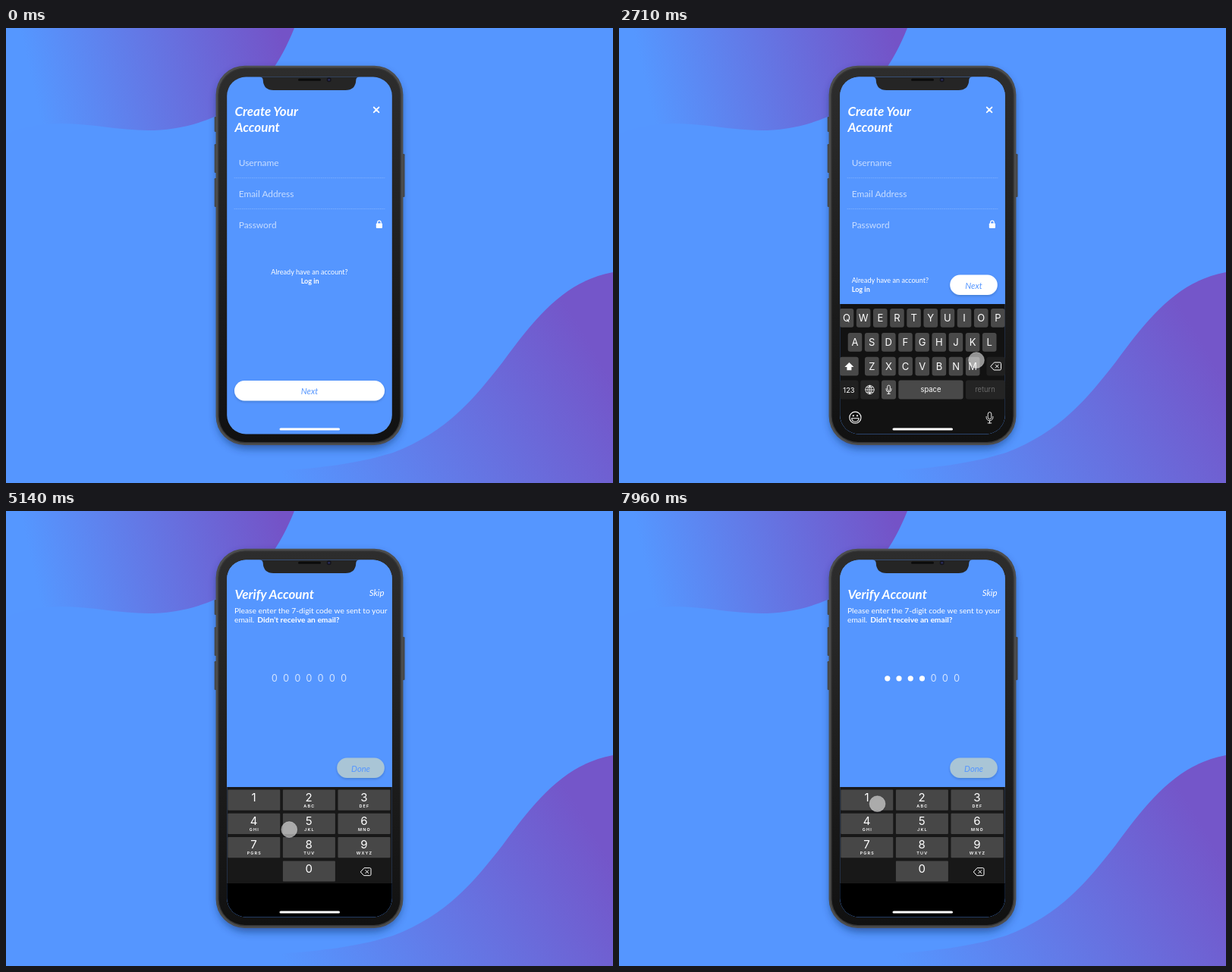
An HTML page that plays this animation: 800 px wide and 600 px high, repeating every 7990 ms.

```html
<!DOCTYPE html>
<html lang="en">
<head>
<meta charset="utf-8">
<title>Sign-up flow</title>
<style>
html, body { margin: 0; width: 100%; height: 100%; overflow: hidden; background: #5596ff; }
svg { display: block; width: 800px; height: 600px; }
text { font-family: Lato, sans-serif; fill: #fff; white-space: pre; }
.title { font-weight: 700; font-style: italic; font-size: 17px; }
.field { font-size: 11.9px; }
.hint { opacity: .68; }
.small { font-size: 9.1px; }
.body { font-size: 10.25px; }
.bold { font-weight: 700; }
.btn { font-size: 11.2px; font-style: italic; fill: #5596ff; text-anchor: middle; }
.key, .num, .sub, .fn { font-family: Inter, Roboto, sans-serif; text-anchor: middle; }
.key { font-size: 13px; }
.num { font-size: 15px; }
.sub { font-size: 5.4px; font-weight: 600; letter-spacing: 1.2px; }
.fn { font-size: 9.4px; }
.line { fill: none; stroke: #fff; stroke-linecap: round; stroke-linejoin: round; }
</style>
</head>
<body>
<svg id="stage" viewBox="0 0 800 600"></svg>
<script>
const LOOP = 7990, SLIDE = 222, BLUE = '#5596ff', KEY = '#494949';

const rect = (x, y, w, h, r, fill, more = '') =>
  `<rect x="${x}" y="${y}" width="${w}" height="${h}" rx="${r}" fill="${fill}" ${more}/>`;
const text = (x, y, cls, s, more = '') => `<text x="${x}" y="${y}" class="${cls}" ${more}>${s}</text>`;
const line = (d, w = 1, more = '') => `<path class="line" d="${d}" stroke-width="${w}" ${more}/>`;

const homeBar = rect(360.5, 527.5, 79.5, 3, 1.5, '#fff');
const button = (x, y, w, label, fill = '#fff') =>
  rect(x, y, w, 26.5, 13.25, fill, 'filter="url(#soft)"') + text(x + w / 2, y + 18.3, 'btn', label);
const backspace = (x, y) =>
  line(`M${x - 7} ${y}l4.5 -5h7.5q1.5 0 1.5 1.5v7q0 1.5 -1.5 1.5h-7.5z` +
       `M${x - .7} ${y - 2}l4 4m0 -4l-4 4`, 1);
const mic = (x, y, k) =>
  line(`M${x - 2 * k} ${y - 4 * k}a${2 * k} ${2 * k} 0 0 1 ${4 * k} 0v${4 * k}a${2 * k} ${2 * k} 0 0 1 ${-4 * k} 0z` +
       `M${x - 3.8 * k} ${y - k}v${k}a${3.8 * k} ${3.8 * k} 0 0 0 ${7.6 * k} 0v${-k}` +
       `M${x} ${y + 4 * k}v${2.5 * k}m${-2 * k} 0h${4 * k}`, .9);

function keyboard() {
  let s = rect(289, 364, 222, 174, 0, '#121212');
  const row = (letters, cx, y) => [...letters].forEach((c, i) => {
    const x = cx + i * 22.15;
    s += rect(x - 9.3, y, 18.6, 24.7, 3, KEY) + text(x, y + 17.1, 'key', c);
  });
  row('QWERTYUIOP', 300, 370);
  row('ASDFGHJKL', 311, 402);
  row('ZXCVBNM', 333.3, 433.8);
  s += rect(291, 433.8, 24.7, 24.7, 3, KEY) +
    '<path d="M303.4 441l6 6h-3v4.2h-6v-4.2h-3z" fill="#fff"/>';
  s += rect(484.5, 433.8, 24.5, 24.7, 3, '#202020') + backspace(497, 446);
  s += rect(291, 464.5, 24.5, 25, 3, '#202020') + text(303, 480.5, 'fn', '123');
  s += rect(318.3, 464.5, 24.5, 25, 3, '#262626') +
    line('M324.8 477a5.7 5.7 0 1 0 11.4 0a5.7 5.7 0 1 0 -11.4 0h11.4M330.5 471.3v11.4' +
         'M330.5 471.3q-5.4 5.7 0 11.4q5.4 -5.7 0 -11.4M326.2 473.7h8.6M326.2 480.3h8.6', .8);
  s += rect(346, 464.5, 19, 25, 3, KEY) + mic(355.5, 476.5, .9);
  s += rect(368.3, 464.5, 85.3, 25, 3, KEY) + text(411, 480, 'fn', 'space');
  s += rect(457, 464.5, 52, 25, 3, '#242424') + text(482.5, 480, 'fn', 'return', 'style="fill:#696969"');
  s += line('M303.8 513.7a7.6 7.6 0 1 0 15.2 0a7.6 7.6 0 1 0 -15.2 0M306.6 514.8h9.6q-.6 4.4 -4.8 4.4t-4.8 -4.4z', 1.1) +
    '<circle cx="308.8" cy="511.3" r="1.1" fill="#fff"/><circle cx="314" cy="511.3" r="1.1" fill="#fff"/>';
  return s + mic(488.5, 513.5, 1.15);
}

function keypad() {
  let s = rect(289, 364, 224, 127.5, 0, '#181818') + rect(289, 491, 224, 46, 0, '#000');
  const subs = ['', 'ABC', 'DEF', 'GHI', 'JKL', 'MNO', 'PGRS', 'TUV', 'WXYZ'];
  const key = (col, row, digit, sub) => {
    const x = 292.3 + col * 72.6, y = 367.5 + row * 31.3;
    s += rect(x, y, 69, 27.2, 1, '#474747') + text(x + 34.3, y + 15.2, 'num', digit);
    if (sub) s += text(x + 35, y + 23, 'sub', sub);
  };
  subs.forEach((sub, i) => key(i % 3, Math.floor(i / 3), i + 1, sub));
  key(1, 3, 0);
  return s + backspace(474.5, 475.7);
}

const header = rect(289, 64, 222, 472, 0, BLUE) +
  text(301.5, 115.7, 'title', 'Create Your') + text(301.5, 136.7, 'title', 'Account') +
  line('M484.8 104.6l6.6 6.6m0 -6.6l-6.6 6.6', 1.9) +
  [197.7, 238.5].map(y => line(`M301 ${y}H499`, 1, 'opacity=".2" stroke-dasharray="1 1.6"')).join('') +
  rect(487.8, 257.5, 8.2, 6.5, 1, '#fff') + line('M489.6 258v-1.6a2.3 2.3 0 0 1 4.6 0v1.6', 1.2);

const fields = ids => [['Username', 182.2], ['Email Address', 223.2], ['Password', 263.6]]
  .map(([s, y], i) => text(306.7, y, 'field hint', s, ids ? `id="field${i}"` : '')).join('');

const welcome = header + fields(false) +
  text(400, 325.2, 'small', 'Already have an account?', 'text-anchor="middle"') +
  text(400.7, 337.2, 'small bold', 'Log in', 'text-anchor="middle"') +
  button(301, 465, 198, 'Next') + homeBar;

const signup = header + fields(true) +
  text(306.7, 336.4, 'small', 'Already have an account?') + text(306.7, 348.4, 'small bold', 'Log in') +
  button(436.2, 325.5, 62.6, 'Next') + keyboard() + homeBar;

const verify = rect(289, 64, 224, 472, 0, BLUE) +
  text(301.5, 115.7, 'title', 'Verify Account') +
  text(498.5, 112.3, '', 'Skip', 'font-size="11.4" font-style="italic" text-anchor="end"') +
  text(301, 134.7, 'body', 'Please enter the 7-digit code we sent to your') +
  text(301, 146.7, 'body', 'email.') + text(331.3, 146.7, 'body bold', 'Didn’t receive an email?') +
  Array.from({length: 7}, (_, i) => {
    const x = 353.8 + i * 15.22;
    return text(x, 225.3, 'digit', '0', 'font-size="12.4" text-anchor="middle" opacity=".75"') +
      `<circle class="dot" cx="${x}" cy="220.8" r="3.6" fill="#fff"/>`;
  }).join('') +
  button(436.2, 325.5, 62.6, 'Done', '#a9c5d6') + keypad() + homeBar;

const phone =
  rect(279, 56, 242, 498, 38, '#102a60', 'opacity=".6" filter="url(#shade)"') +
  [[274.7, 117, 20], [274.7, 153, 38], [274.7, 198, 38], [521.5, 166, 57]]
    .map(([x, y, h]) => rect(x, y, 4, h, 1.2, '#454749')).join('') +
  rect(276.6, 49.7, 246.8, 500.2, 38, '#4c4d4e') +
  rect(279.2, 52.2, 241.6, 495.2, 36, '#363636') +
  rect(280.6, 53.6, 238.8, 492.4, 34.5, 'url(#body)');

const notch = '<path d="M334 64.5q4.5 0 4.7 4q.6 13.5 14 13.5h94.6q13.4 0 14 -13.5q.2 -4 4.7 -4z" fill="#252525"/>' +
  rect(385, 66.8, 30, 3, 1.5, '#0b0b0b') +
  '<circle cx="425.7" cy="68.3" r="3" fill="#14141c"/><circle cx="425.7" cy="68.3" r="1.4" fill="#2b2d5c"/>';

const gradient = (id, x1, y1, x2, y2, a, b) =>
  `<linearGradient id="${id}" gradientUnits="userSpaceOnUse" x1="${x1}" y1="${y1}" x2="${x2}" y2="${y2}">` +
  `<stop stop-color="${a}"/><stop offset="1" stop-color="${b}"/></linearGradient>`;

const stage = document.getElementById('stage');
stage.innerHTML = '<defs>' +
  gradient('waveA', 40, 95, 365, 20, '#5597ff', '#7453c7') +
  gradient('waveB', 370, 600, 745, 375, '#5596ff', '#7456c9') +
  gradient('body', 0, 54, 0, 546, '#2d2d2d', '#111') +
  `<clipPath id="screen">${rect(291.2, 64.5, 217.6, 471, 25, '#000')}</clipPath>
  <filter id="shade" x="-20%" y="-20%" width="140%" height="140%"><feGaussianBlur stdDeviation="6"/></filter>
  <filter id="soft" x="-20%" y="-30%" width="140%" height="170%"><feDropShadow dx="0" dy="1.5" stdDeviation="1.5" flood-color="#123" flood-opacity=".22"/></filter>
  </defs>` +
  rect(0, 0, 800, 600, 0, BLUE) +
  `<path d="M0 0H380C362 45 335 90 275 117C245 130 215 135 187 135C150 135 110 126 75 126C45 126 20 131 0 140z" fill="url(#waveA)"/>
  <path d="M800 322C735 334 697 383 655 440C618 487 583 532 510 560C430 585 350 582 285 590Q262 593 245 600H800z" fill="url(#waveB)"/>` +
  phone +
  `<g clip-path="url(#screen)">
    <g>${welcome}</g><g id="signup">${signup}</g><g id="verify">${verify}</g>
  </g>` + notch +
  '<circle id="touch" fill="#fff" stroke="#fff" stroke-width=".6" stroke-opacity=".5" filter="url(#soft)"/>';

const $ = id => document.getElementById(id);
const signupEl = $('signup'), verifyEl = $('verify'), touch = $('touch');
const digits = document.querySelectorAll('.digit'), dots = document.querySelectorAll('.dot');

// time, x, y and an optional bend point for the way there
const stops = [
  [1000, 484, 482], [1780, 351, 175, 300, 360], [2000, 351, 175],
  [2590, 471, 438], [2830, 471, 438], [3330, 340, 228], [3560, 340, 228],
  [3880, 400, 446], [3960, 400, 446], [4380, 476, 344], [4600, 476, 344],
  [5360, 349, 438], [5430, 349, 438], [5890, 401, 380], [6230, 401, 380],
  [6740, 470, 446], [6870, 470, 446], [7420, 399, 428], [7530, 399, 428], [8010, 339, 385]
];
const presses = [2790, 3450, 3920, 4400, 5395, 6190, 6805, 7475];
const entries = [5400, 6230, 6820, 7490];

const clamp = v => Math.max(0, Math.min(1, v));
const span = (t, start, length) => clamp((t - start) / length);
const easeOut = u => 1 - (1 - u) ** 3;
const swing = u => .5 - .5 * Math.cos(Math.PI * u);

function place(t) {
  const i = Math.max(1, stops.findIndex(s => s[0] > t));
  const [t0, x0, y0] = stops[i - 1], [t1, x1, y1, bx = (x0 + x1) / 2, by = (y0 + y1) / 2] = stops[i];
  const u = swing(span(t, t0, t1 - t0)), v = 1 - u;
  return [v * v * x0 + 2 * u * v * bx + u * u * x1, v * v * y0 + 2 * u * v * by + u * u * y1];
}

function fill(i, hint, value, count) {
  const el = $('field' + i), n = Math.round(count);
  el.textContent = n ? value.slice(0, n) : hint;
  el.classList.toggle('hint', !n);
}

function draw(t) {
  signupEl.setAttribute('opacity', easeOut(span(t, 1785, 150)));
  fill(0, 'Username', 'lilybee', 7 * span(t, 2800, 260));
  fill(1, 'Email Address', 'lil@example.com', 4 * span(t, 3230, 100) + 11 * span(t, 3900, 280));

  const shift = SLIDE * easeOut(span(t, 4400, 415));
  signupEl.setAttribute('transform', `translate(${-shift} 0)`);
  verifyEl.setAttribute('transform', `translate(${SLIDE - shift} 0)`);
  verifyEl.setAttribute('visibility', shift ? 'visible' : 'hidden');

  const typed = entries.filter(e => t >= e).length;
  digits.forEach((d, i) => d.setAttribute('display', i < typed ? 'none' : 'inline'));
  dots.forEach((d, i) => d.setAttribute('display', i < typed ? 'inline' : 'none'));

  const [x, y] = place(t);
  const press = Math.max(...presses.map(p => clamp(1 - Math.abs(t - p) / 70)));
  touch.setAttribute('cx', x);
  touch.setAttribute('cy', y);
  touch.setAttribute('r', 10.4 - .8 * press);
  touch.setAttribute('fill-opacity', .52 - .22 * press);
  touch.setAttribute('opacity', span(t, 1000, 200));
}

function tick() {
  draw(performance.now() % LOOP);
  requestAnimationFrame(tick);
}
tick();
</script>
</body>
</html>
```
